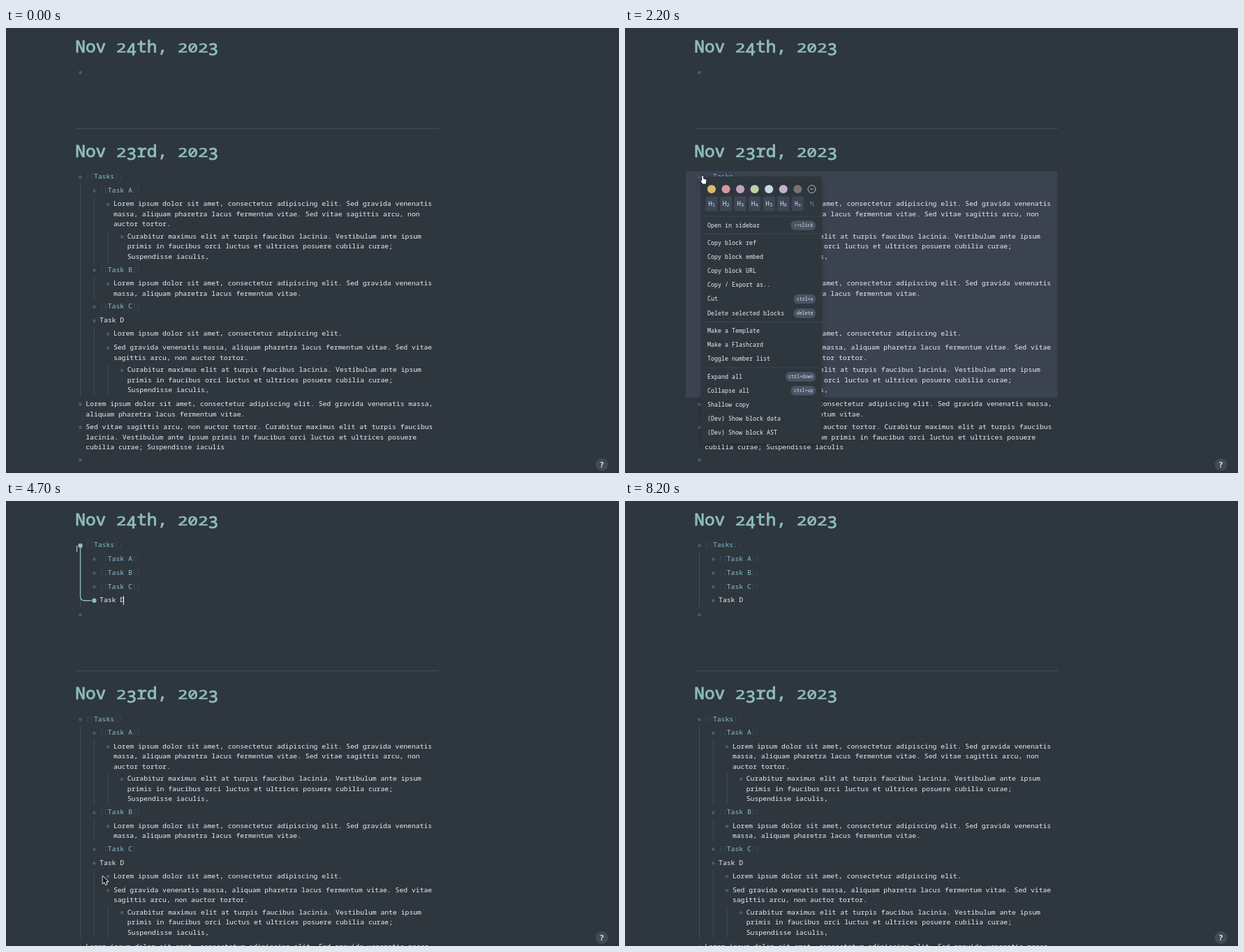
Recreate the animation shown at these times as an HTML page with a canvas. Size 878 by 638 pixels, loop 8.3 s.

```html
<!DOCTYPE html>
<html lang="en">
<head>
<meta charset="utf-8">
<title>Shallow copy of blocks</title>
<style>
html, body { margin: 0; width: 100%; height: 100%; overflow: hidden; background: #2e363e; }
canvas { display: block; }
</style>
</head>
<body>
<canvas id="stage" width="878" height="638"></canvas>
<script>
const ctx = document.getElementById('stage').getContext('2d');
const LOOP = 8300, STEP = 100;
const MONO = '"Noto Sans Mono", "DejaVu Sans Mono", monospace';
const BODY = 9.755, SMALL = 8.36, LEADING = 14.5, SHIFT = 99.4;
const C = {
  bg: '#2e363e', text: '#eceff4', link: '#88c0d0', teal: '#8fbcbb', bullet: '#4c566a',
  guide: '#434c5a', bracket: '#404b59', select: '#3b4250', toast: '#434c5e', tag: '#4a5464'
};

const CURAB = 'Curabitur maximus elit at turpis faucibus lacinia. Vestibulum ante ipsum|' +
  'primis in faucibus orci luctus et ultrices posuere cubilia curae;|Suspendisse iaculis,';

// [indent level, y, text]; "#" marks a page link, "|" a line break
const journal = [
  [0, 213.5, '#Tasks'],
  [1, 233, '#Task A'],
  [2, 252.5, 'Lorem ipsum dolor sit amet, consectetur adipiscing elit. Sed gravida venenatis|' +
    'massa, aliquam pharetra lacus fermentum vitae. Sed vitae sagittis arcu, non|auctor tortor.'],
  [3, 299, CURAB],
  [1, 347, '#Task B'],
  [2, 366.5, 'Lorem ipsum dolor sit amet, consectetur adipiscing elit. Sed gravida venenatis|' +
    'massa, aliquam pharetra lacus fermentum vitae.'],
  [1, 399.5, '#Task C'],
  [1, 419.5, 'Task D'],
  [2, 438.5, 'Lorem ipsum dolor sit amet, consectetur adipiscing elit.'],
  [2, 458.5, 'Sed gravida venenatis massa, aliquam pharetra lacus fermentum vitae. Sed vitae|' +
    'sagittis arcu, non auctor tortor.'],
  [3, 490.5, CURAB],
  [0, 539.2, 'Lorem ipsum dolor sit amet, consectetur adipiscing elit. Sed gravida venenatis massa,|' +
    'aliquam pharetra lacus fermentum vitae.'],
  [0, 572.2, 'Sed vitae sagittis arcu, non auctor tortor. Curabitur maximus elit at turpis faucibus|' +
    'lacinia. Vestibulum ante ipsum primis in faucibus orci luctus et ultrices posuere|' +
    'cubilia curae; Suspendisse iaculis'],
  [0, 619, '']
];
const guides = [[0, 223, 528], [1, 242, 336], [2, 290, 336], [1, 356, 389], [1, 429, 527], [2, 482, 527]];
const copied = [
  [0, 63.5, '#Tasks'], [1, 83, '#Task A'], [1, 102.8, '#Task B'],
  [1, 122.7, '#Task C'], [1, 142.5, 'Task D'], [0, 162.8, '']
];

// [y, label, shortcut, shortcut box left]
const items = [
  [283, 'Open in sidebar', '⇧+click', 237.5],
  [308, 'Copy block ref'], [328, 'Copy block embed'], [348, 'Copy block URL'],
  [368.5, 'Copy / Export as..'], [388.5, 'Cut', 'ctrl+x', 241.5],
  [409, 'Delete selected blocks', 'delete', 241.5],
  [434, 'Make a Template'], [454, 'Make a Flashcard'], [474.5, 'Toggle number list'],
  [500, 'Expand all', 'ctrl+down', 230], [520, 'Collapse all', 'ctrl+up', 237.5],
  [540.2, 'Shallow copy'], [560.5, '(Dev) Show block data'], [580.5, '(Dev) Show block AST']
];
const swatches = ['#d9ba70', '#d6999f', '#c0a2b9', '#c2d0a7', '#c3dae2', '#c0b2cd', '#79726f'];

const HAND = new Path2D('M2.2 1.2Q2.2 0 3.2 0Q4.2 0 4.2 1.2V4.2L7.6 5Q8.6 5.4 8.5 6.8L7.9 9.8V11.6H3.2L.4 7.6Q0 6.5 1 6.5L2.2 7.4Z');
const ARROW = new Path2D('M0 0V10.5L2.5 8.3L4.2 12L6 11.2L4.4 7.6H7.8Z');
const BEAM = new Path2D('M-2.5 -5.5H2.5M0 -5.5V5.5M-2.5 5.5H2.5');

const clamp = v => Math.min(1, Math.max(0, v));
const progress = (t, a, b) => clamp((t - a) / (b - a));
const easeOut = p => 1 - (1 - p) ** 2;
const easeBoth = p => p * p * (3 - 2 * p);
const mix = (a, b, p) => a.map((v, i) => v + (b[i] - v) * p);

function write(str, x, y, size, color, weight = 400, align = 'left') {
  ctx.font = `${weight} ${size}px ${MONO}`;
  ctx.textAlign = align;
  ctx.fillStyle = color;
  ctx.fillText(str, x, y + size * 0.357);
}
function rect(x, y, w, h, color, r = 0) {
  ctx.fillStyle = color;
  ctx.beginPath();
  ctx.roundRect(x, y, w, h, r);
  ctx.fill();
}
function dot(x, y, r, color) {
  ctx.fillStyle = color;
  ctx.beginPath();
  ctx.arc(x, y, r, 0, Math.PI * 2);
  ctx.fill();
}
function stroke(path, color, width) {
  ctx.strokeStyle = color;
  ctx.lineWidth = width;
  ctx.stroke(path);
}
const stem = level => 106.5 + level * 19.85;

// Semi-bold heading with old-style figures: 0 and 2 at x-height, 3 and 4 descending
function heading(str, baseline) {
  const size = 24.4;
  ctx.font = `400 ${size}px ${MONO}`;
  ctx.textAlign = 'left';
  ctx.fillStyle = ctx.strokeStyle = C.teal;
  ctx.lineWidth = 0.9;
  ctx.lineJoin = 'round';
  [...str].forEach((ch, i) => {
    ctx.save();
    ctx.translate(99.3 + i * size * 0.6, baseline + ('34'.includes(ch) ? 4.4 : 0));
    if ('02'.includes(ch)) ctx.scale(1, 0.77);
    ctx.fillText(ch, 0, 0);
    ctx.strokeText(ch, 0, 0);
    ctx.restore();
  });
}

function block([level, y, str], dy = 0) {
  const x = stem(level) + 7.7, cy = y + dy, ty = cy - 0.55;
  dot(stem(level), cy + 0.5, 2.4, C.bullet);
  if (str[0] === '#') {
    const name = str.slice(1), cell = BODY * 0.6;
    write('[[', x, ty, BODY, C.bracket);
    write(name, x + 2 * cell, ty, BODY, C.link);
    write(']]', x + (2 + name.length) * cell, ty, BODY, C.bracket);
  } else {
    str.split('|').forEach((line, i) => write(line, x, ty + i * LEADING, BODY, C.text));
  }
}
function guide(level, top, bottom) {
  rect(stem(level) - 0.5, top, 1, bottom - top, C.guide);
}

function thread() {
  stroke(new Path2D('M106.5 64V137Q106.5 142.7 112.2 142.7H122M101.5 64V73'), C.teal, 1.4);
  dot(106.5, 64, 3.2, C.teal);
  dot(126.3, 142.8, 3.2, C.teal);
}

function page(t) {
  const done = t >= 4700, dy = done ? SHIFT : 0;
  rect(0, 0, 878, 638, C.bg);
  rect(0, 636, 878, 2, '#2b3239');
  heading('Nov 24th, 2023', 35);
  if (t >= 2000 && t < 4600) {
    const color = t < 4400 ? C.select : t < 4500 ? '#343b49' : '#2e3440';
    rect(87, 205.5, 532.5, 324.5, color);
  }
  if (done) {
    guide(0, 73, 152);
    copied.forEach(b => block(b));
    if (t < 8200) thread();
    // The text caret toggles every 600 ms
    if (t < 8200 && Math.floor((t - 4700) / 600) % 2 === 0) rect(168, 136, 1, 13, C.text);
  } else {
    block([0, 63.5, '']);
  }
  rect(100, 143.5 + dy, 520, 1, '#48525f');
  heading('Nov 23rd, 2023', 185 + dy);
  guides.forEach(([level, a, b]) => guide(level, a + dy, b + dy));
  if (t >= 1100 && t < 2000) {
    dot(106.5, 214, 5, C.bullet);
    ctx.fillStyle = '#7d8794';
    ctx.fill(new Path2D('M95.2 212.6H101L98.1 215.8Z'));
  }
  journal.forEach(b => block(b, dy));
  dot(853.5, 626, 9, '#414a57');
  write('?', 853.5, 626, 10.5, C.text, 700, 'center');
}

function menu(t, cursor) {
  ctx.save();
  ctx.globalAlpha = [0.4, 0.8][(t - 2000) / STEP] || 1;
  ctx.shadowColor = 'rgba(0,0,0,.25)';
  ctx.shadowBlur = 6;
  ctx.shadowOffsetY = 2;
  rect(109, 213, 172.5, 383, C.bg, 3);
  ctx.shadowColor = 'transparent';

  swatches.forEach((color, i) => dot(124 + i * 20.55, 231, 6.1, color));
  stroke(new Path2D('M273 231A5.5 5.5 0 1 1 262 231A5.5 5.5 0 1 1 273 231M265 231H270'), '#b5bec9', 1);
  for (let i = 0; i < 8; i++) {
    const x = 124 + i * 20.55;
    if (i < 7) {
      rect(x - 8.5, 241.5, 17, 21, '#3d4654', 2);
      write('H', x - 2, 252, i < 6 ? 9.5 : 8, '#dde2ea', 400, 'center');
      write(i < 6 ? String(i + 1) : '≡', x + 3, 253.5, 6.5, '#dde2ea', 400, 'center');
    } else {
      write('H', x, 252, 9, '#69727f', 400, 'center');
      stroke(new Path2D(`M${x - 4} 248L${x + 4} 256`), '#69727f', 1);
    }
  }
  [270, 295, 421.5, 487].forEach(y => rect(109, y - 0.5, 172.5, 1, '#3c4552'));
  for (const [y, label, keys, left] of items) {
    if (Math.abs(cursor[1] + 1.5 - y) < 10) rect(109, y - 10, 172.5, 20, C.select);
    write(label, 118, y, SMALL, C.text);
    if (keys) {
      rect(left, y - 6.8, 273 - left, 13.6, C.tag, 6);
      write(keys, 269.4, y, 6.5, '#dfe4ec', 400, 'right');
    }
  }
  ctx.restore();
}

function toast(t) {
  const p = easeOut(progress(t, 4700, 5100));
  ctx.save();
  ctx.globalAlpha = p;
  ctx.translate(8 * (1 - p), 0);
  ctx.shadowColor = 'rgba(0,0,0,.3)';
  ctx.shadowBlur = 6;
  ctx.shadowOffsetY = 2;
  rect(652, 5.5, 215, 40, C.toast, 3);
  ctx.shadowColor = 'transparent';
  stroke(new Path2D('M672.2 20.3A5.2 5.2 0 1 1 661.8 20.3A5.2 5.2 0 1 1 672.2 20.3M664.8 20.5L666.4 22.1L669.4 18.8'), '#a3be8c', 1.1);
  write('Copied [4] blocks to Nov 24th,', 680, 20, SMALL, C.text, 500);
  write('2023!', 680, 31.5, SMALL, C.text, 500);
  stroke(new Path2D('M849.3 16.8L855.7 23.2M855.7 16.8L849.3 23.2'), '#aab3c0', 1.1);
  ctx.restore();
}

function pointer(t) {
  if (t < 2500) return mix([45, 176], [108, 212], easeOut(progress(t, 600, 1200)));
  if (t < 3100) return mix([108, 212], [140, 484], easeBoth(progress(t, 2500, 3000)));
  if (t < 5900) return mix([140, 484], [137.4, 537.5], easeOut(progress(t, 3100, 3400)));
  return mix([138.5, 538], [18, 500], easeBoth(progress(t, 5900, 6500)));
}

function drawCursor(t, [x, y]) {
  ctx.save();
  ctx.lineJoin = 'round';
  if (t >= 1100 && t < 4400) {
    ctx.translate(x, y);
    stroke(HAND, '#111', 1.4);
    ctx.fillStyle = '#fff';
    ctx.fill(HAND);
  } else if (t >= 4400 && t < 4700) {
    ctx.translate(138.5, 538.5);
    stroke(BEAM, '#fff', 2.6);
    stroke(BEAM, '#111', 0.9);
  } else {
    if (t >= 4700 && t < 5900) ctx.translate(138.5, 538);
    else ctx.translate(x, y);
    stroke(ARROW, '#fff', 1.6);
    ctx.fillStyle = '#14181c';
    ctx.fill(ARROW);
  }
  ctx.restore();
}

function draw(t) {
  const cursor = pointer(t);
  page(t);
  if (t >= 2000 && t < 4400) menu(t, cursor);
  if (t >= 4800 && t < 7000) toast(t);
  if (t >= 600 && t < 6600) drawCursor(t, cursor);
}

const start = performance.now();
function tick() {
  const t = (performance.now() - start) % LOOP;
  draw(Math.floor(t / STEP) * STEP);
  requestAnimationFrame(tick);
}
tick();
</script>
</body>
</html>
```
